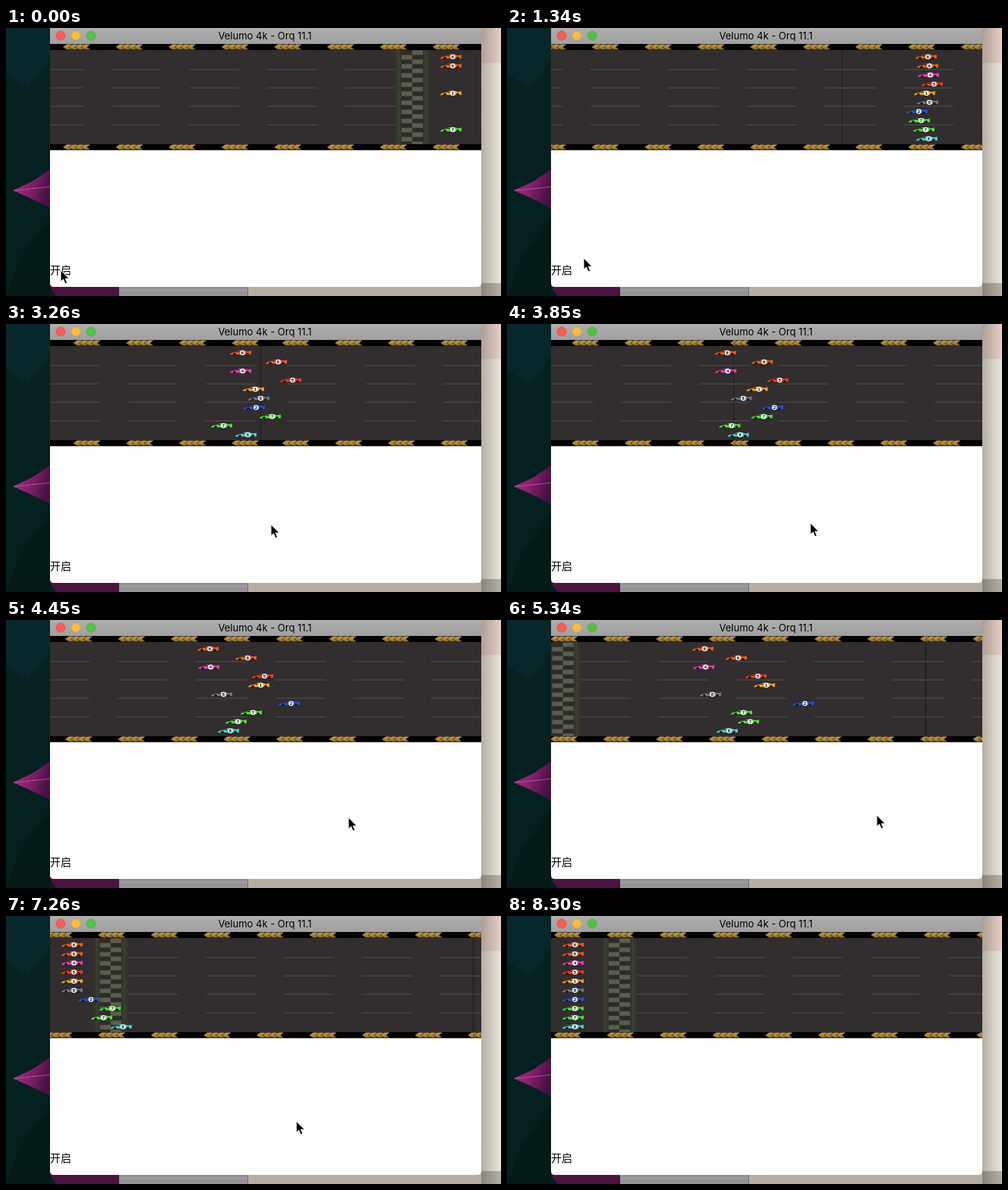
Recreate the animation shown at these times as an HTML page. Size 652 by 353 pixels, loop 9050 ms.

```html
<!DOCTYPE html>
<html lang="zh">
<head>
<meta charset="utf-8">
<title>Race</title>
<style>
  html, body { margin: 0; width: 100%; height: 100%; overflow: hidden; background: #ece6d9; }
  svg { display: block; }
  .title { font: 13px Inter, "Open Sans", sans-serif; }
  .label { font: 14px "Noto Sans CJK SC", "Noto Sans CJK", sans-serif; }
  .num { font: bold 6px "Liberation Sans", sans-serif; }
</style>
</head>
<body>
<svg id="stage" width="652" height="353" viewBox="0 0 652 353">
  <defs>
    <linearGradient id="leaf" x1="0" y1="0" x2="1" y2="0.3">
      <stop offset="0" stop-color="#a03a7c"/><stop offset=".5" stop-color="#8a2273"/><stop offset="1" stop-color="#4a1145"/>
    </linearGradient>
    <linearGradient id="bar" x1="0" y1="0" x2="0" y2="1">
      <stop offset="0" stop-color="#aeaeae"/><stop offset="1" stop-color="#a0a0a0"/>
    </linearGradient>
    <linearGradient id="shade">
      <stop offset="0" stop-color="#000" stop-opacity=".24"/><stop offset="1" stop-color="#000" stop-opacity="0"/>
    </linearGradient>
    <linearGradient id="gold" x1="0" y1="0" x2="0" y2="1">
      <stop offset="0" stop-color="#c09a50"/><stop offset=".5" stop-color="#ad8840"/><stop offset="1" stop-color="#806329"/>
    </linearGradient>
    <clipPath id="track"><rect x="58" y="21" width="568" height="140"/></clipPath>
    <g id="arrows" fill="url(#gold)"></g>
  </defs>

  <rect width="652" height="353" fill="#ece6d9"/>
  <rect x="600" width="52" height="46" fill="#e6d0c5"/>
  <rect width="150" height="353" fill="#04201f"/>
  <path d="M0 0H58V40L30 80L0 60Z" fill="#07282a"/>
  <path d="M58 250L20 300L0 353H58Z" fill="#031a17"/>
  <path d="M9 214L35 202L58 186V237L32 224Z" fill="url(#leaf)"/>
  <path d="M10 214Q32 212 58 209" fill="none" stroke="#b8508f" stroke-width="1.2"/>
  <path d="M58 341L66 353H149V336H58Z" fill="#4b1540"/>
  <rect x="149" y="336" width="170" height="17" fill="#949496"/>
  <path d="M149 345.5H318" stroke="#a9a9ab"/>
  <rect x="319" y="336" width="333" height="17" fill="#b5afa3"/>
  <rect x="318" y="336" width="1" height="17" fill="#77746f"/>
  <rect x="626" y="0" width="26" height="353" fill="url(#shade)"/>

  <path d="M58 0H626V336Q626 341 621 341H63Q58 341 58 336Z" fill="#fff"/>
  <rect x="58" width="568" height="21" fill="url(#bar)"/>
  <g stroke-width=".6">
    <circle cx="72" cy="10" r="6" fill="#fc5b57" stroke="#d9443f"/>
    <circle cx="92" cy="10" r="6" fill="#fdbc40" stroke="#dca035"/>
    <circle cx="112" cy="10" r="6" fill="#4fc544" stroke="#3fa636"/>
  </g>
  <text class="title" x="341" y="15" text-anchor="middle">Velumo 4k - Orq 11.1</text>
  <g clip-path="url(#track)">
    <rect x="58" y="21" width="568" height="140"/>
    <g id="road"></g>
    <g id="cars"></g>
  </g>
  <text class="label" x="58" y="324">开启</text>
  <path id="cursor" d="M0 0V15.2L3.5 12L6 18L8.7 16.9L6.2 11.2H11Z" stroke="#fff" stroke-width="1" stroke-linejoin="round"/>
</svg>
<script>
const LOOP = 9050, LEFT = 58, WIDTH = 568;
const DASH_STEP = 102.7, ARROW_STEP = 69.57;
const FINISH = 2840;
const $ = id => document.getElementById(id);

function add(parent, tag, attrs, text) {
  const el = document.createElementNS('http://www.w3.org/2000/svg', tag);
  for (const key in attrs) el.setAttribute(key, attrs[key]);
  if (text) el.textContent = text;
  parent.appendChild(el);
  return el;
}
const rect = (parent, x, y, width, height, fill) => add(parent, 'rect', { x, y, width, height, fill });

for (let i = 0; i < 4; i++)
  add($('arrows'), 'path', { d: `M${i * 8} 4L${i * 8 + 5} .5h7L${i * 8 + 7.5} 4l4.5 3.5h-7Z` });

// Road sections from right to left: left edge, phase of the dashes, phase of the arrows.
const sections = [
  [LEFT, 138.5, 75],
  [-510, 34, 6],
  [-1360, -1325, -1401],
  [-1800, -1433, -1537],
  [-2214, -2153, -2152],
  [LEFT - FINISH, 171 - FINISH, 62 - FINISH]
];

function repeat(phase, step, left, right, size, draw) {
  let x = phase - Math.ceil((phase - left + size) / step) * step;
  for (; x < right; x += step) if (x + size > left) draw(x - left);
}

let right = LEFT + WIDTH;
for (const [left, dash, arrow] of sections) {
  const part = add($('road'), 'svg', { x: left, y: 0, width: right - left, height: 161 });
  rect(part, 0, 29, right - left, 124, '#322d2f');
  repeat(dash, DASH_STEP, left, right, 66, x => {
    for (const y of [54, 78.3, 102.3, 126.8]) rect(part, x, y, 66, 1.4, '#4b4648');
  });
  repeat(arrow, ARROW_STEP, left, right, 36, x => {
    for (const y of [21, 153]) add(part, 'use', { href: '#arrows', x, y });
  });
  right = left;
}

function line(x, blankX) {
  const road = $('road');
  rect(road, blankX, 29, 68, 124, '#322d2f');
  rect(road, x, 29, 45, 124, '#343729');
  rect(road, x + 3, 29, 2, 124, '#3d4133');
  rect(road, x + 39, 29, 2, 124, '#3d4133');
  rect(road, x + 8, 29, 28.5, 124, '#2b2c25');
  for (let i = 0; i < 21; i++)
    rect(road, x + (i % 2 ? 8 : 22), 29.5 + i * 6, 14.2, Math.min(6, 123.5 - i * 6), '#5b5d50');
}
line(513, 558);
line(126 - FINISH, LEFT - FINISH);

// Colour, number, then the left edge at each of the key times.
const carTimes = [778, 1340, 3260, 4450, 5340, 6380];
const GRID = 572, REST = 73;
const cars = [
  ['#e8601f', 6, 538, 295, 252, 244, 73],
  ['#e8601f', 6, 540, 342, 302, 288, 86],
  ['#e83fb0', 4, 541, 295, 253, 245, 103],
  ['#ee3a1c', 5, 546, 361, 324, 314, 159],
  ['#eea427', 1, 536, 312, 319, 325, 142],
  ['#6f7680', 8, 540, 319, 270, 254, 153],
  ['#1f55d8', 2, 526, 313, 359, 376, 224],
  ['#4fe03a', 7, 529, 334, 309, 295, 202],
  ['#4fe03a', 7, 535, 270, 289, 304, 200],
  ['#45d3c8', 8, 539, 302, 279, 276, 201]
].map(([color, number, ...stops], row) => {
  const g = add($('cars'), 'g', {});
  add(g, 'path', { d: 'M0 5.6Q2 3.4 8 2.8Q11 .6 16 .6Q20 .8 23 2.2L28 1.2V5.8L26 7H1Z', fill: color });
  add(g, 'path', { d: 'M8.5 3L11.5 1.3L13 3.2ZM1 6.2H27V7.2H2Z', fill: '#2a2426' });
  for (const cx of [6, 23]) add(g, 'circle', { cx, cy: 5.6, r: 1.9, fill: '#211d1f' });
  add(g, 'circle', { cx: 16.5, cy: 4, r: 3.2, fill: '#fff' });
  add(g, 'text', { class: 'num', x: 16.5, y: 6.1, 'text-anchor': 'middle' }, String(number));
  return { g, y: 34 + row * 12, early: [0, 1, 4, 8].includes(row), stops: [GRID, ...stops] };
});

const cursorTimes = [0, 150, 450, 800, 1340, 1940, 3260, 4450, 5340, 6380, 6820, 7850, 8150];
const cursorX = [72, 68, 72, 72, 101, 180, 349, 451, 487, 386, 384, 380, 378];
const cursorY = [319, 318, 319, 319, 303, 279, 264, 260, 257, 250, 256, 289, 360];

// Linear between keys; the last stretch goes on at its own speed.
function along(times, values, t) {
  if (t <= times[0]) return values[0];
  let i = 1;
  while (i < times.length - 1 && t > times[i]) i++;
  const k = (t - times[i - 1]) / (times[i] - times[i - 1]);
  return values[i - 1] + (values[i] - values[i - 1]) * k;
}

// The picture is refreshed in runs of near-even steps: first, last, count.
const ticks = [0, 150, 450];
for (const [first, last, count] of [
  [890, 1790, 7], [1940, 2960, 8], [3260, 4300, 8], [4450, 5490, 8],
  [5640, 6670, 8], [6820, 7850, 8], [8000, 8300, 3]
])
  for (let k = 0; k < count; k++)
    ticks.push(Math.floor((first + (last - first) * k / (count - 1)) / 10) * 10);

function scroll(t) {
  const cruise = 0.683 * (t - 778);
  const brake = FINISH - 7.95e-6 * (8400 - t) ** 2;
  return Math.max(0, Math.min(cruise, brake));
}

const move = (el, x, y) => el.setAttribute('transform', `translate(${x.toFixed(2)} ${y.toFixed(2)})`);

function draw(time) {
  const t = ticks.filter(tick => tick <= time).pop();
  move($('road'), scroll(t), 0);
  for (const car of cars) {
    move(car.g, Math.max(REST, along(carTimes, car.stops, t)), car.y);
    car.g.setAttribute('visibility', car.early || t >= 150 ? 'visible' : 'hidden');
  }
  move($('cursor'), along(cursorTimes, cursorX, t), along(cursorTimes, cursorY, t));
}

const start = performance.now();
function tick() {
  draw((performance.now() - start) % LOOP);
  requestAnimationFrame(tick);
}
tick();
</script>
</body>
</html>
```
